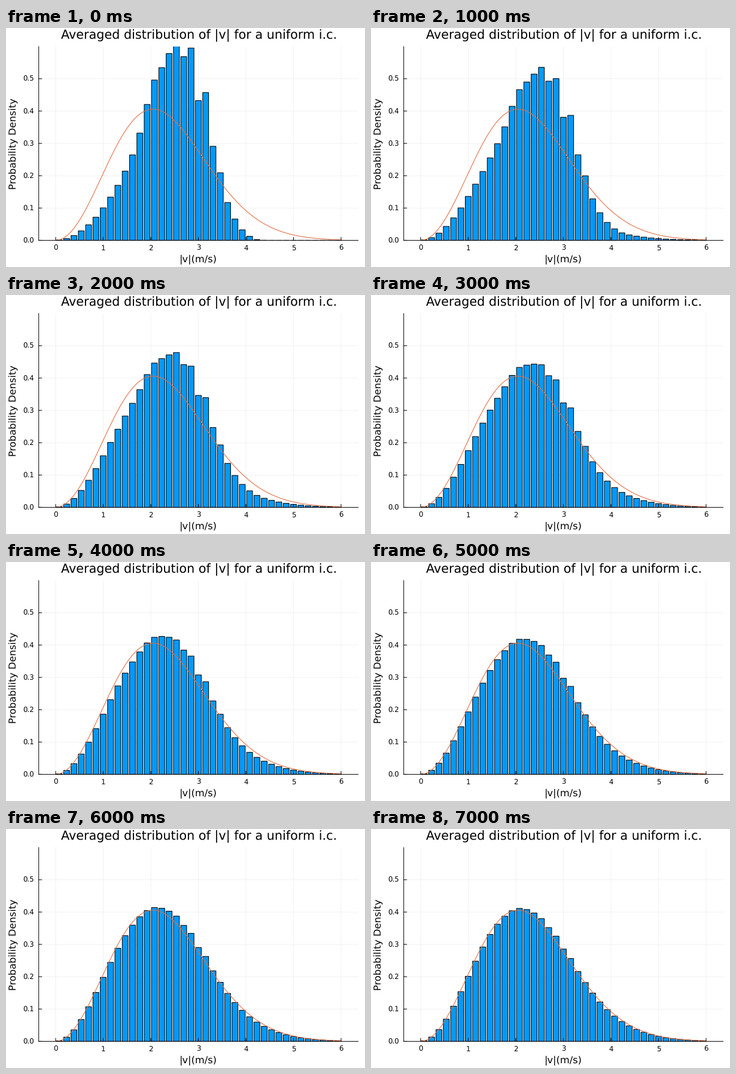
Write a matplotlib script that moves like this. It is 600 by 400 pixels and loops after 8000 ms.

```python
import numpy as np
import matplotlib.pyplot as plt
from matplotlib.animation import FuncAnimation
from matplotlib.patches import Rectangle

PX = 0.72  # points per pixel at 100 dpi
LEFT, RIGHT, TOP, BASE = 54.7, 588.5, 31, 355.4
UNIT_X, UNIT_Y = 79.5, 541
BINS, V_MAX = 39, 6
BIN = V_MAX / BINS
SIGMA = 1.446  # thermal speed of one velocity component
RATE = 0.4     # relaxation per second

plt.rcParams.update({"font.family": "DejaVu Sans", "text.hinting": "none"})


def px(v):
    return 83 + UNIT_X * v


def py(p):
    return BASE - UNIT_Y * p


def maxwell(v):
    return np.sqrt(2 / np.pi) * v**2 / SIGMA**3 * np.exp(-v**2 / (2 * SIGMA**2))


def uniform_cube():
    """Speed density when each component is uniform with the same variance."""
    n = 100
    c = ((np.arange(n) + 0.5) / n * SIGMA * np.sqrt(3)) ** 2
    speed = np.sqrt(c[:, None, None] + c[:, None] + c)
    return np.histogram(speed, BINS, (0, V_MAX), density=True)[0]


def sampling_bumps():
    """Uneven peaks left by the small first sample."""
    i = np.arange(BINS)
    shoulder = 0.065 * np.exp(-((i - 12.8) / 1.6) ** 2)
    twin_peak = np.exp(-((i - 19) / 1.7) ** 2) * (0.044 + 0.066 * np.cos(np.pi * i))
    return shoulder + twin_peak


centers = (np.arange(BINS) + 0.5) * BIN
start = uniform_cube() + sampling_bumps()
settled = maxwell(centers)


def heights(second):
    return settled + np.exp(-RATE * second) * (start - settled)


fig = plt.figure(figsize=(6, 4), dpi=100, facecolor="white")
ax = fig.add_axes([0, 0, 1, 1])
ax.set(xlim=(0, 600), ylim=(400, 0))
ax.axis("off")


def line(xs, ys, color="black", width=1.0, **kw):
    ax.plot(xs, ys, color=color, lw=width * PX, snap=False, **kw)


def label(x, y, text, size, **kw):
    ax.text(x, y, text, fontsize=size * PX, va="baseline",
            rotation_mode="anchor", **kw)


grid = dict(alpha=0.1, width=0.5, zorder=1)
for v in range(7):
    x = px(v)
    line([x, x], [TOP, BASE], **grid)
    line([x, x], [BASE, BASE - 5], zorder=4)
    label(x, 371.5, str(v), 11.8, ha="center")
for k in range(6):
    y = py(k / 10)
    line([LEFT, RIGHT], [y, y], **grid)
    line([LEFT, LEFT + 5], [y, y], zorder=4)
    label(47, y + 4.4, f"{k / 10:.1f}", 11.8, ha="right")
line([LEFT, LEFT], [TOP, BASE], zorder=4)
line([LEFT, RIGHT], [BASE, BASE], zorder=4)

label(322.4, 18, "Averaged distribution of |v| for a uniform i.c.", 20.75, ha="center")
label(321.6, 392, "|v|(m/s)", 16.24, ha="center")
label(16.5, 193.2, "Probability Density", 16.24, ha="center", rotation=90)

plot_area = Rectangle((LEFT, TOP), RIGHT - LEFT, BASE - TOP + 0.5,
                      transform=ax.transData)
bars = []
for c in centers:
    bar = Rectangle((px(c - 0.4 * BIN), BASE), UNIT_X * 0.8 * BIN, 0,
                    facecolor="#009AFA", edgecolor="black", lw=1.05 * PX,
                    zorder=2, snap=False)
    ax.add_patch(bar)
    bar.set_clip_path(plot_area)
    bars.append(bar)

v = np.linspace(0, V_MAX, 300)
line(px(v), py(maxwell(v)), color="#E26F46", width=1.1, zorder=3)


def draw(second):
    for bar, h in zip(bars, heights(second)):
        bar.set_height(py(h) - BASE)
    return bars


anim = FuncAnimation(fig, draw, frames=8, interval=1000, repeat=True,
                     repeat_delay=0)
plt.show()
```
